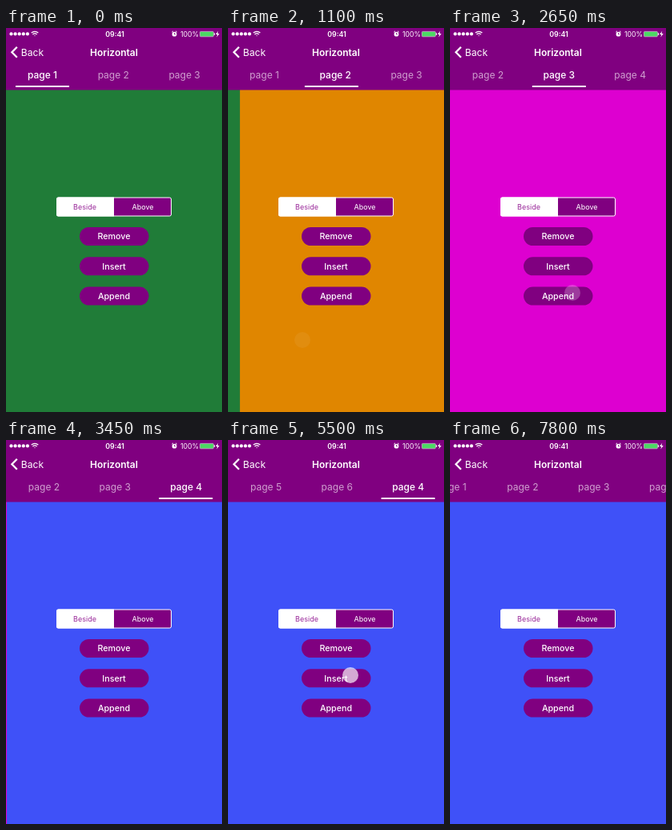
An HTML page for the animation above (8 s loop, 270x480 px).

```html
<!DOCTYPE html>
<html lang="en">
<head>
<meta charset="utf-8">
<title>Horizontal pages</title>
<style>
  html, body { margin: 0; width: 100%; height: 100%; overflow: hidden; background: #800080; }
  svg { display: block; width: 100vw; height: 100vh; font-family: Inter, "Open Sans", sans-serif; }
  text { fill: #fff; text-anchor: middle; }
  .tab { font-size: 12px; fill: #cf9fcf; }
  .tab.on { fill: #fff; font-weight: 500; }
  .button { font-size: 10.7px; font-weight: 500; }
  .segment { font-size: 9px; }
  .purple { fill: #800080; }
</style>
</head>
<body>
<svg viewBox="0 0 270 480" preserveAspectRatio="none">
  <g id="pages"></g>

  <rect class="purple" x="63.5" y="212" width="143" height="23" rx="2" stroke="#fff"/>
  <path d="M135 211.5H65.5a2.5 2.5 0 0 0-2.5 2.5v19a2.5 2.5 0 0 0 2.5 2.5H135z" fill="#fff"/>
  <text class="segment" x="98.5" y="226.8" style="fill:#9a2a9a">Beside</text>
  <text class="segment" x="171" y="226.8">Above</text>
  <g id="buttons"></g>

  <rect class="purple" width="270" height="77.5"/>
  <g id="tabs"></g>
  <rect id="underline" y="72" width="67" height="2" fill="#fff"/>

  <g id="dots" fill="#fff"></g>
  <g fill="none" stroke="#fff" stroke-width="1.3">
    <path d="M31.7 6.1q4.3-3.6 8.6 0M33.4 8q2.6-2.1 5.2 0"/>
    <circle cx="36" cy="9.6" r=".6" fill="#fff" stroke="none"/>
    <path d="M13.8 23.8L7.4 30.2l6.4 6.5" stroke-width="2.3"/>
  </g>
  <circle cx="210.5" cy="7.7" r="2.9" fill="#fff"/>
  <path d="M207.3 5.2l1.7-1.4M213.7 5.2l-1.7-1.4" stroke="#fff"/>
  <path d="M210.5 6v1.9h1.6" fill="none" stroke="#800080" stroke-width=".8"/>
  <rect x="242.4" y="4.4" width="17" height="6.4" rx="1" fill="#4cd964" stroke="#d9b3d9" stroke-width=".7"/>
  <path d="M260.5 6.3v2.6" stroke="#fff"/>
  <path d="M265.2 3.8l-3.2 4.3h2.2l-.8 3.3 3.3-4.4h-2.2z" fill="#fff"/>
  <text x="136" y="10.6" font-size="8.8" font-weight="600">09:41</text>
  <text x="229.5" y="10.6" font-size="8.7">100%</text>
  <text x="33" y="34.6" font-size="12.1">Back</text>
  <text x="135" y="34.6" font-size="12" font-weight="600">Horizontal</text>

  <circle id="touch" r="10" fill="#fff"/>
</svg>
<script>
const LOOP = 8000, STEP = 50, WIDTH = 270;
const FIRST_TAB = 45.5, TAB_GAP = 88.8;
const APPEND = 2480, INSERT_ONE = 4550, INSERT_TWO = 5480;
const DRAG_START = 6350, DRAG_END = 6730, FADE = 250;
const colors = ['#207c38', '#e08600', '#dd00d0', '#3f51f8'];

const $ = id => document.getElementById(id);
const clamp = v => Math.max(0, Math.min(1, v));
const mix = (a, b, u) => a + (b - a) * u;

function add(parent, tag, attrs, label) {
  const node = document.createElementNS('http://www.w3.org/2000/svg', tag);
  for (const key in attrs) node.setAttribute(key, attrs[key]);
  if (label) node.textContent = label;
  return parent.appendChild(node);
}

const pages = colors.map(fill => add($('pages'), 'rect', { y: 77, width: WIDTH + .5, height: 403, fill }));
const tabs = [1, 2, 3, 4, 5, 6].map(n => add($('tabs'), 'text', { y: 63.2 }, 'page ' + n));
['Remove', 'Insert', 'Append'].forEach((label, i) => {
  const y = 249 + i * 37.3;
  add($('buttons'), 'rect', { class: 'purple', x: 92, y, width: 86.5, height: 23, rx: 11.5 });
  add($('buttons'), 'text', { class: 'button', x: 135, y: y + 15.4 }, label);
});
for (let i = 0; i < 5; i++) add($('dots'), 'circle', { cx: 6.5 + i * 5.1, cy: 7.4, r: 2.1 });

const swipes = [
  { down: 400, start: 490, up: 870 },
  { down: 1430, start: 1510, up: 1800 },
  { down: 2720, start: 2770, up: 2950 }
];

// Finger drag, then an exponential snap to the next page.
function swipeProgress(t, { start, up }) {
  if (t < up) return .45 * clamp((t - start) / (up - start)) ** 2;
  const rest = .55 * Math.exp(-(t - up) / 100);
  return rest < .0015 ? 1 : 1 - rest;
}

const tap = (down, up, y) => ({ down, start: down, up, from: [153, y], to: [153, y] });
const touches = [
  ...swipes.map(s => ({ ...s, from: [215, 390], to: [93, 390] })),
  tap(2370, APPEND, 331),
  tap(4440, INSERT_ONE, 294),
  tap(5360, INSERT_TWO, 294),
  { down: 6280, start: DRAG_START, up: DRAG_END, from: [102, 52], to: [208, 52] }
];

function pageOrder(t) {
  if (t < APPEND) return [1, 2, 3];
  if (t < INSERT_ONE) return [1, 2, 3, 4];
  return t < INSERT_TWO ? [1, 2, 3, 5, 4] : [1, 2, 3, 5, 6, 4];
}

function tabScroll(t, count) {
  const end = count > 3 ? (count - 3) * TAB_GAP - 2 : 0;
  const glide = time => 28 + 93 * Math.exp(-.002 * (time - 6900));
  if (t >= DRAG_END) return glide(t);
  return mix(end, glide(DRAG_END), clamp((t - DRAG_START) / (DRAG_END - DRAG_START)));
}

function drawTouch(t) {
  const active = touches.find(p => t >= p.down && t < p.up + FADE);
  $('touch').setAttribute('opacity', 0);
  if (!active) return;
  const { start, up, from, to } = active;
  const u = up > start ? clamp((t - start) / (up - start)) : 1;
  const move = to[1] === 390 ? u * u : u;
  const fade = clamp((t - up) / FADE);
  $('touch').setAttribute('cx', mix(from[0], to[0], move));
  $('touch').setAttribute('cy', mix(from[1], to[1], move));
  $('touch').setAttribute('opacity', .72 * (1 - fade));
}

function draw(t) {
  const position = swipes.reduce((sum, s) => sum + swipeProgress(t, s), 0);
  const order = pageOrder(t);
  const scroll = tabScroll(t, order.length);
  const tabPosition = position + Math.max(0, order.length - 4);
  const selected = order[Math.round(tabPosition)];

  pages.forEach((page, i) => page.setAttribute('x', (i - position) * WIDTH));
  tabs.forEach((tab, i) => {
    const index = order.indexOf(i + 1);
    tab.style.display = index < 0 ? 'none' : '';
    tab.setAttribute('x', FIRST_TAB + index * TAB_GAP - scroll);
    tab.setAttribute('class', i + 1 === selected ? 'tab on' : 'tab');
  });
  $('underline').setAttribute('x', FIRST_TAB + tabPosition * TAB_GAP - scroll - 33.5);
  drawTouch(t);
}

const origin = performance.now();
function frame() {
  const t = (performance.now() - origin) % LOOP;
  draw(Math.min(7800, Math.floor(t / STEP) * STEP));
  requestAnimationFrame(frame);
}
frame();
</script>
</body>
</html>
```
